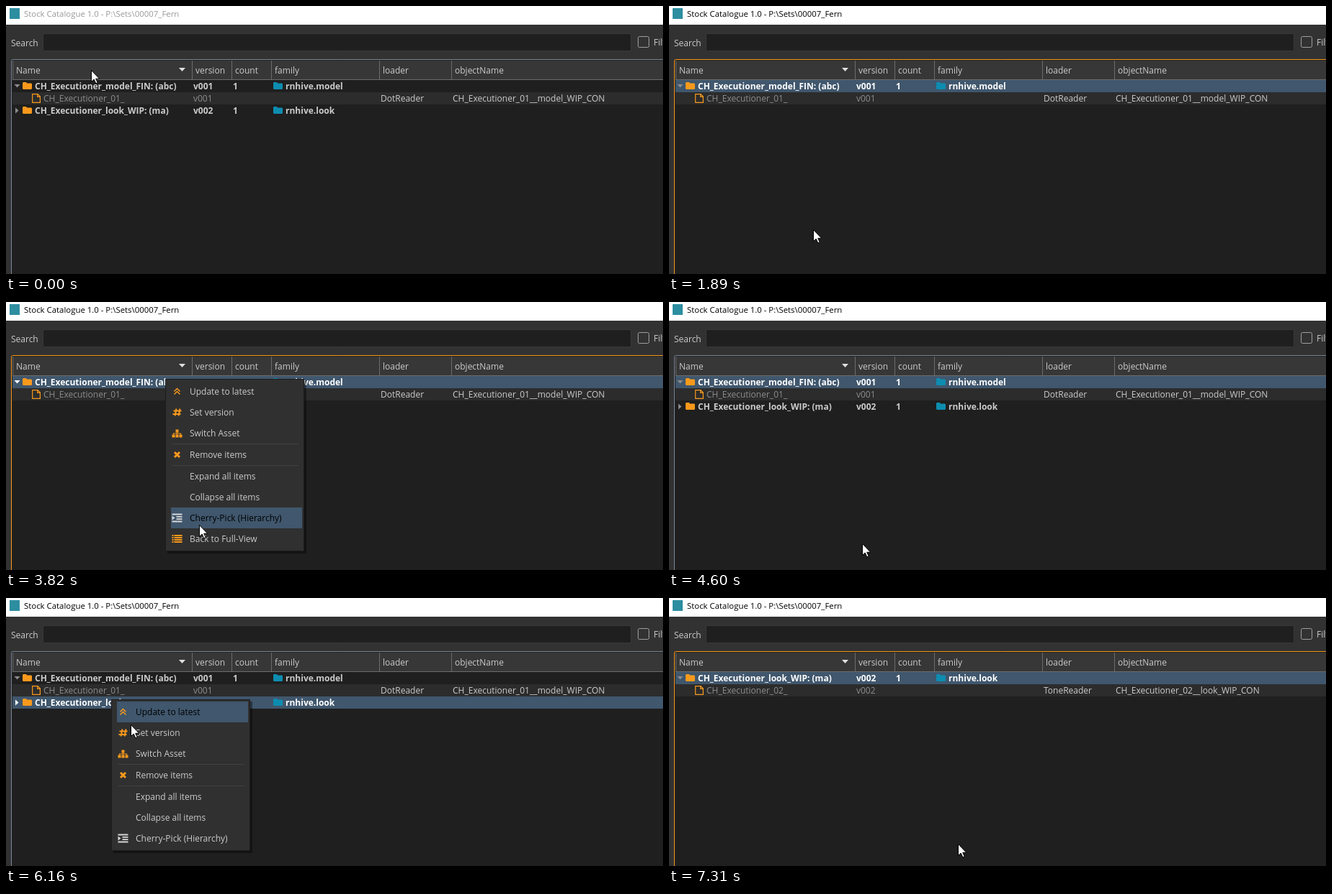
Animation, 912 px wide and 373 px high, one loop 8 s. Source, as an HTML page with a canvas:

```html
<!DOCTYPE html>
<html lang="en">
<head>
<meta charset="utf-8">
<style>
html, body { margin: 0; width: 100%; height: 100%; overflow: hidden; background: #323232; }
canvas { display: block; }
</style>
</head>
<body>
<canvas id="stage" width="912" height="373"></canvas>
<script>
const LOOP = 8000, ROW = 17, ROWS_TOP = 103, ITEM = 29, LAG = 50;
const ORANGE = '#f9991c', CYAN = '#0d8db0', BLUE = '#40576d', HOVER = '#78879b';
const TEXT = '#cbcbcb', DIM = '#8c8c8c', LINE = '#6c6c6c', DARK = '#1f1f1f';
const ctx = document.getElementById('stage').getContext('2d');

const columns = { Name: 9, version: 258, count: 313, family: 368, loader: 518, objectName: 618 };

// Pointer glides; it rests in between
const home = { x: 118, y: 89 };
const glides = [
  { start: 70, end: 400, x: 104, y: 106 },
  { start: 880, end: 1100, x: 165, y: 220 },
  { start: 1100, end: 1250, x: 186, y: 296 },
  { start: 1500, end: 1890, x: 200, y: 311 },
  { start: 1970, end: 2400, x: 190, y: 44 },
  { start: 2480, end: 2980, x: 221, y: 119 },
  { start: 3060, end: 3130, x: 223, y: 124 },
  { start: 3130, end: 3250, x: 221, y: 107 },
  { start: 3450, end: 3820, x: 268, y: 310 },
  { start: 3820, end: 3970, x: 268, y: 336 },
  { start: 4620, end: 5220, x: 141, y: 162 },
  { start: 5320, end: 5540, x: 146, y: 141 },
  { start: 6000, end: 6160, x: 173, y: 176 },
  { start: 6160, end: 6620, x: 215, y: 335 },
  { start: 7000, end: 7310, x: 401, y: 342 }
];

// Each menu opens at the resting pointer; the view changes shortly after it closes
const menus = [
  { open: 560, close: 1430, row: 0, count: 7 },
  { open: 3310, close: 4460, row: 0, count: 8 },
  { open: 5730, close: 7010, row: 2, count: 7 }
];
const [cherryModel, fullView, cherryLook] = menus.map(m => m.close + 80);

const items = [
  ['Update to latest', chevrons], ['Set version', hash], ['Switch Asset', tree], ['Remove items', cross],
  ['Expand all items'], ['Collapse all items'], ['Cherry-Pick (Hierarchy)', indent], ['Back to Full-View', list]
];

function asset(kind, number, tag, loader) {
  const version = 'v00' + number, name = `CH_Executioner_0${number}_`;
  return [
    { name: `CH_Executioner_${kind}_${tag}`, version, family: 'rnhive.' + kind },
    { child: true, name, version, loader, object: `${name}_${kind}_WIP_CON` }
  ];
}
const model = asset('model', 1, 'FIN: (abc)', 'DotReader');
const look = asset('look', 2, 'WIP: (ma)', 'ToneReader');

function rowsAt(t) {
  if (t >= cherryLook) return look;
  return t >= cherryModel && t < fullView ? model : [...model, look[0]];
}

function pointer(t) {
  let { x, y } = home;
  for (const g of glides) {
    if (t <= g.start) break;
    const k = Math.min(1, (t - g.start) / (g.end - g.start));
    const ease = k * k * (3 - 2 * k);
    x += (g.x - x) * ease;
    y += (g.y - y) * ease;
  }
  return { x, y };
}

function rect(x, y, w, h, color) {
  ctx.fillStyle = color;
  ctx.fillRect(x, y, w, h);
}

function box(x, y, w, h, border, fill = 'transparent', radius = 2) {
  ctx.beginPath();
  ctx.roundRect(x + .5, y + .5, w - 1, h - 1, radius);
  ctx.fillStyle = fill;
  ctx.fill();
  ctx.strokeStyle = border;
  ctx.lineWidth = 1;
  ctx.stroke();
}

function text(s, x, y, color = TEXT, weight = 400, size = 12) {
  ctx.font = `${weight} ${size}px "Open Sans", sans-serif`;
  ctx.fillStyle = color;
  ctx.fillText(s, x, y);
}

function shape(d, color) {
  ctx.fillStyle = color;
  ctx.fill(new Path2D(d));
}

function lines(d, color, width) {
  ctx.strokeStyle = color;
  ctx.lineWidth = width;
  ctx.stroke(new Path2D(d));
}

function at(x, y, paint) {
  ctx.save();
  ctx.translate(x, y);
  paint();
  ctx.restore();
}

// Icons, drawn around 0,0
function chevrons() { lines('M-4 0L0 -4L4 0M-4 4L0 0L4 4', ORANGE, 1.5); }
function hash() { lines('M-1 -5L-3 5M4 -5L2 5M-5 -2H6M-6 2.5H5', ORANGE, 2); }
function cross() { lines('M-3.5 -3.5L3.5 3.5M3.5 -3.5L-3.5 3.5', ORANGE, 3); }
function tree() {
  shape('M-2 -5h4v4h-4zM-7 2h4v4h-4zM-2 2h4v4h-4zM3 2h4v4h-4z', ORANGE);
  lines('M0 -2V2M-5 2V.5H5V2', ORANGE, 1.2);
}
function indent() {
  lines('M-7 -5H7M-1 -1.7H7M-1 1.7H7M-7 5H7', '#d8d8d8', 1.8);
  shape('M-7 -3L-3 0L-7 3z', '#d8d8d8');
}
function list() {
  for (let y = -4.5; y < 5; y += 3) lines(`M-7 ${y}h2m1 0h11`, ORANGE, 2);
}
function folder(color) { shape('M1 0h4l1 1.5h6l1 1v6.5l-1 1h-11l-1 -1v-8z', color); }
function file() { lines('M.7 .7H8L11.4 4V12.3H.7ZM7.7 .7V4.4H11.4', ORANGE, 1.2); }

function drawWindow(t, hierarchy, overSearch) {
  rect(0, 0, 912, 373, '#323232');
  rect(0, 0, 912, 26, '#fff');
  rect(5, 3, 14, 15, '#2c8ea0');
  text('Stock Catalogue 1.0 - P:\\Sets\\00007_Fern', 25, 14.5, t < 550 ? '#999' : '#000', 400, 11.4);
  text('Search', 7, 56);
  box(51, 38, 817, 25, overSearch ? HOVER : '#3a3939', DARK);
  box(877, 42, 16, 16, '#a0a0a0');
  text('Filter', 899, 55);

  box(7, 74, 920, 320, hierarchy ? ORANGE : HOVER, DARK);
  rect(9, 76, 903, 26, '#373737');
  rect(9, 102, 903, 1, LINE);
  for (const name in columns) {
    rect(columns[name], 76, 1, 27, LINE);
    text(name, columns[name] + 5, 94);
  }
  shape('M240 86h9l-4.5 5z', '#e0e0e0');
}

function drawRow(row, i, selected, hover, open) {
  const y = ROWS_TOP + ROW * i;
  const main = selected || hover ? '#fff' : TEXT, dim = hover ? '#fff' : DIM;
  const cell = (s, column, color, weight, indent = 2) => text(s, columns[column] + indent, y + 13, color, weight);
  if (row.child) {
    rect(9, y, 903, ROW, '#2c2c2c');
    at(36, y + 2, file);
    cell(row.name, 'Name', dim, 400, 43);
    cell(row.version, 'version', dim);
    cell(row.loader, 'loader', main);
    cell(row.object, 'objectName', main);
    return;
  }
  if (selected) rect(9, y, 903, ROW, BLUE);
  at(15, y + 8.5, () => shape(open ? 'M-3.5 -2.5h8l-4 4.5z' : 'M-2 -4l4.5 4l-4.5 4z', dim));
  at(23, y + 3, () => folder(ORANGE));
  at(371, y + 3, () => folder(CYAN));
  cell(row.name, 'Name', main, 700, 31);
  cell(row.version, 'version', main, 700);
  cell('1', 'count', main, 700);
  cell(row.family, 'family', main, 700, 20);
}

function drawMenu(menu, t) {
  const origin = pointer(menu.open);
  const { x, y } = pointer(t - LAG);
  const height = 8 + ITEM * menu.count;
  ctx.globalAlpha = Math.min(1, (t - menu.open) / 150);
  at(origin.x, origin.y, () => {
    rect(3, 3, 193, height, 'rgba(0,0,0,.4)');
    box(0, 0, 193, height, '#1c1c1c', '#303030', 0);
    items.slice(0, menu.count).forEach(([label, icon], i) => {
      const separators = Math.min(2, Math.max(0, i - 2));
      const top = 3 + ITEM * i + separators;
      const local = y - origin.y - top;
      const on = x >= origin.x + 8 && local >= 0 && local < ITEM;
      if (i === 3 || i === 4) rect(10, top - 1, 175, 1, '#414141');
      if (on) rect(8, top, 182, ITEM, BLUE);
      text(label, 34, top + 19, on ? '#000' : TEXT);
      if (icon) at(16.5, top + 14.5, icon);
    });
  });
  ctx.globalAlpha = 1;
}

function drawPointer({ x, y }) {
  const arrow = 'M0 0V16L3.7 12.6L6.3 18.3L8.7 17.2L6.2 11.8H11.2z';
  at(Math.round(x) + .5, Math.round(y) + .5, () => {
    shape(arrow, '#fff');
    lines(arrow, '#000', 1);
  });
}

function draw(t) {
  const tip = pointer(t), rows = rowsAt(t);
  const menu = menus.find(m => t >= m.open && t < m.close);
  const selected = t < 550 ? -1 : t >= 5690 && t < cherryLook ? 2 : 0;
  const hover = menu ? menu.row : Math.floor((tip.y - ROWS_TOP) / ROW);
  drawWindow(t, rows.length === 2, !menu && tip.y >= 38 && tip.y < 63);
  rows.forEach((row, i) => drawRow(row, i, i === selected, i === hover, i === 0));
  if (menu) drawMenu(menu, t);
  drawPointer(tip);
}

const start = performance.now();
function tick() {
  draw((performance.now() - start) % LOOP);
  requestAnimationFrame(tick);
}
tick();
</script>
</body>
</html>
```
